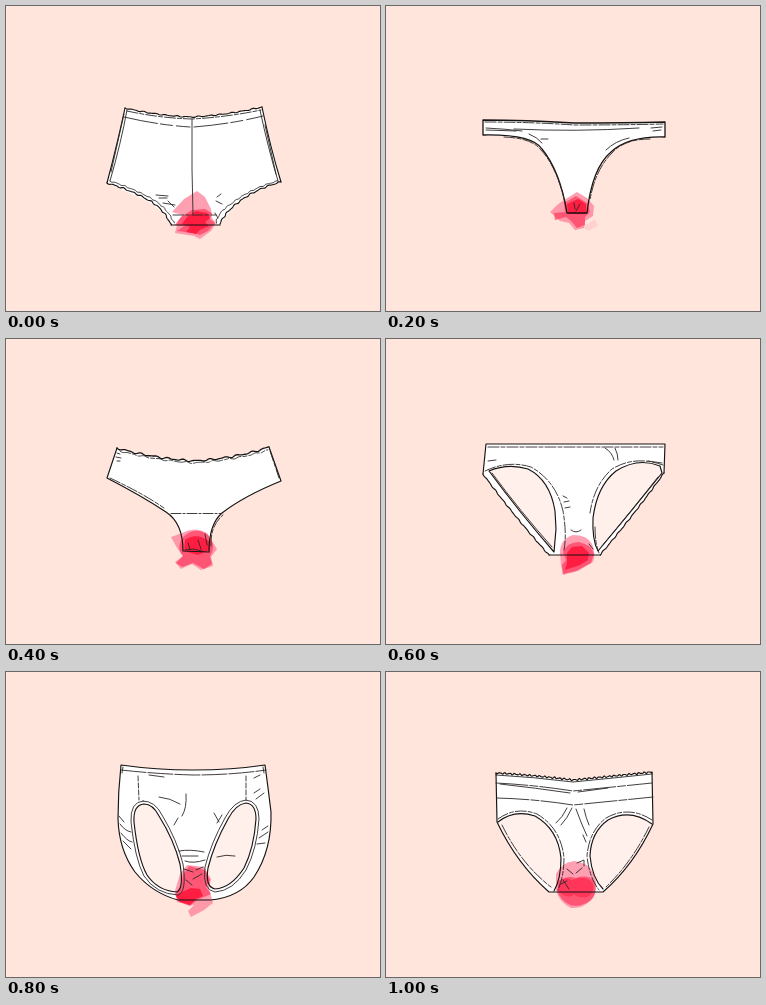
Animation, 374 px wide and 305 px high, one loop 1.2 s. Source, as an HTML page:

```html
<!DOCTYPE html>
<html lang="en">
<head>
<meta charset="utf-8">
<title>Underwear loop</title>
<style>
  html, body { margin: 0; width: 100%; height: 100%; overflow: hidden; background: #ffe5dc; }
  svg { display: block; width: 100%; height: 100%; }
  .pose { visibility: hidden; animation: show 1200ms step-end infinite; animation-delay: calc(var(--i) * 200ms - 1200ms); }
  .pose:first-child { animation-delay: 0ms; }
  @keyframes show {
    0% { visibility: visible; }
    16.666%, 100% { visibility: hidden; }
  }
  path { fill: none; stroke: #161313; stroke-width: 1.15; stroke-linecap: round; stroke-linejoin: round; }
  .cloth { fill: #fff; stroke: none; }
  .back { fill: #fff0ec; stroke: none; }
  .thin { stroke-width: .9; stroke: #2e2929; }
  .stitch { stroke-width: .9; stroke: #2e2929; stroke-dasharray: 11 2 4 2; }
  .stain path { stroke: none; fill: #ff0f35; }
  .stain .pale { fill: #ff7f98; opacity: .75; }
  .stain .mid { fill: #ff3c60; opacity: .72; }
  .stain .deep { opacity: .8; }
</style>
</head>
<body>
<svg viewBox="0 0 374 305" preserveAspectRatio="none">
  <!-- boyshorts -->
  <g class="pose" style="--i:0">
    <path class="cloth" d="M119 102Q153 110 186 111Q222 109 256 101L275 176Q247 184 228 201L214 218L165 219Q156 202 137 193L101 177Z"/>
    <g class="stain">
      <path class="pale" d="M166 206L178 193L191 185L199 191L205 203L206 212L210 217L205 225L194 233L188 230L169 227L172 215L177 209Z"/>
      <path class="mid" d="M175 211L186 204L199 203L206 207L204 213L209 217L202 225L194 229L187 227L171 225L178 220L169 219Z"/>
      <path class="deep" d="M181 211L190 205L201 207L204 212L199 216L203 220L194 224L190 228L180 226L184 221L176 218Z"/>
    </g>
    <path data-wave=".4 11" d="M119 102Q153 110 186 111Q222 109 256 101"/>
    <path class="stitch" d="M121 105Q153 112 186 113Q222 111 255 104"/>
    <path class="stitch" style="stroke-dasharray:34 3 12 4" d="M118 111Q152 119 184 121M188 121Q225 118 257 110"/>
    <path d="M119 102Q112 135 101 177M256 101Q264 140 275 176"/>
    <path class="thin" d="M121 104Q115 137 104 175M118 108L105 166M254 104Q262 142 272 175M259 119L270 168"/>
    <path data-wave=".5 10" d="M101 177Q125 184 144 195Q158 203 165 219M275 176Q248 183 229 199Q218 208 214 218"/>
    <path class="thin" data-wave=".4 9" d="M104 175Q129 183 148 194Q162 203 168 217M272 175Q245 182 225 198Q212 206 210 217"/>
    <path d="M165 219L214 219"/>
    <path class="thin" d="M186 113L186 163L187 208M150 189L162 190M153 192L161 192M157 197L169 199M162 195L168 201M211 191L215 188M210 195L216 198M209 207L212 212"/>
    <path class="stitch" d="M167 209L210 209"/>
  </g>

  <!-- thong -->
  <g class="pose" style="--i:1">
    <path class="cloth" d="M97 114Q140 114 188 117Q240 117 279 116L279 131Q242 130 225 146Q206 162 201 207L181 207Q174 165 156 143Q146 128 97 129Z"/>
    <g class="stain">
      <path class="pale" d="M164 206L171 199L178 194L191 186L201 192L208 200L207 210L199 215L198 222L189 224L183 217L174 215Z"/>
      <path class="mid" d="M178 197L190 190L201 197L204 206L199 211L199 219L191 222L185 215L180 211L169 214L168 207L179 206Z"/>
      <path class="deep" d="M181 198L192 193L200 198L200 208L182 208Z"/>
      <path class="pale" style="opacity:.18" d="M197 221L209 213L212 220L202 225Z"/>
    </g>
    <path style="stroke-width:1.3" d="M97 129L97 114Q140 114 188 117Q240 117 279 116L279 131Q242 130 225 146Q206 162 201 207L181 207Q174 165 156 143Q146 128 97 129"/>
    <path class="stitch" d="M99 116Q145 116 188 119Q238 119 277 118M118 131Q146 132 155 144Q171 161 179 197M264 133Q238 133 226 147Q209 164 204 194"/>
    <path class="thin" d="M100 122Q120 123 136 125M100 124L130 125M128 123Q190 126 253 122M265 122L276 121M267 125L275 124M155 133L162 133M143 128Q151 131 156 137M220 144Q229 135 243 132M188 197L189 203M194 198L190 205"/>
  </g>

  <!-- scalloped brief -->
  <g class="pose" style="--i:2">
    <path class="cloth" d="M111 109Q145 119 188 122Q232 119 263 108L275 142Q238 157 216 174Q203 185 203 213L177 212Q177 184 160 173Q136 157 101 139Z"/>
    <g class="stain">
      <path class="pale" d="M165 198L176 194Q189 187 201 194L206 202L211 210L205 218L207 227L195 231L186 225L175 230L169 223L177 217L171 209Z"/>
      <path class="mid" d="M178 197Q190 187 202 196Q211 207 204 217L206 225L198 230L187 224L176 228L170 224L177 217Q169 208 178 197Z"/>
      <path class="deep" d="M179 201Q190 193 203 202L204 211L192 216L178 212Z"/>
    </g>
    <path style="stroke-width:1.3" data-wave=".7 14" d="M111 109Q145 119 188 122Q232 119 263 108"/>
    <path class="stitch" data-wave=".5 14" d="M114 112Q147 121 188 124Q231 121 262 111"/>
    <path d="M111 109L101 139Q136 157 160 173Q177 184 177 212L203 213Q203 185 216 174Q238 157 275 142L263 108"/>
    <path class="stitch" d="M104 139Q138 155 158 169M264 112L273 139M205 207Q204 187 217 176"/>
    <path class="thin" d="M111 114L114 115M110 118L115 119M111 122L114 122M182 204L184 210M192 201L195 210M199 195L201 206M179 211L187 210L196 212"/>
    <path class="thin" style="stroke-dasharray:10 2 2 2" d="M165 174.500L216 174.500"/>
  </g>

  <!-- bikini brief -->
  <g class="pose" style="--i:3">
    <path class="cloth" d="M100 105L279 105L278 134Q247 177 214 216L163 216Q127 176 97 135Z"/>
    <path class="back" d="M103 132Q122 124 142 130Q164 141 169 172L170 190L168 213Q134 174 103 132ZM274 127Q252 118 230 132Q211 147 207 179Q206 201 212 212Q244 174 276 134Z"/>
    <g class="stain">
      <path class="pale" d="M174 214Q174 200 187 196Q201 196 206 205Q210 215 207 223L192 232L177 236L175 226Z"/>
      <path class="mid" d="M177 213Q181 203 193 203Q206 206 208 215L205 224L190 232L177 235L176 226L180 221Z"/>
      <path class="deep" d="M181 214L186 208L196 207L203 214L202 221L194 226L179 231L181 224Z"/>
    </g>
    <path d="M97 135L100 105L279 105L278 134"/>
    <path class="stitch" d="M102 108L277 108"/>
    <path data-wave=".3 12" d="M97 135Q127 176 163 216M278 134Q247 177 214 216"/>
    <path d="M163 216L214 216M103 132Q122 124 142 130Q164 141 169 172L170 190L168 213Q134 174 103 132M274 127Q252 118 230 132Q211 147 207 179Q206 201 212 212Q244 174 276 134Z"/>
    <path class="thin" d="M106 134Q134 172 166 208M272 138Q246 171 216 207"/>
    <path class="stitch" d="M99 132Q122 121 145 128Q170 142 177 172Q181 195 178 211M277 126Q249 116 226 130Q208 146 204 174M209 188Q209 205 213 214"/>
    <path class="thin" d="M219 109Q226 113 228 121M229 109Q232 115 232 121M102 122L110 121M262 122L276 124M177 157L181 159M178 163L183 162M179 169L184 168M185 191Q190 195 195 191M203 205L207 210"/>
  </g>

  <!-- full brief -->
  <g class="pose" style="--i:4">
    <path class="cloth" d="M115 93Q150 98 187 98Q226 98 259 93Q262 115 265 140Q266 178 248 205Q234 225 205 228L172 228Q146 221 129 200Q113 178 112 147Q112 120 115 93Z"/>
    <path class="back" d="M138 132Q147 132 153 144Q168 168 174 192Q178 216 171 220Q152 219 141 203Q132 187 128 150Q127 133 138 132ZM240 131Q250 132 250 147Q248 176 238 196Q225 216 209 217Q199 215 202 196Q208 172 222 147Q230 132 240 131Z"/>
    <g class="stain">
      <path class="pale" d="M174 202L181 193L198 195L205 207L203 217L207 231L198 238L185 245L182 239L188 233L171 230L169 219Z"/>
      <path class="mid" d="M177 203L183 194L199 198L204 208L200 215L205 222L191 228L184 234L173 230L169 222L175 214Z"/>
      <path class="deep" d="M176 220L185 216L194 217L197 224L190 227L184 233L174 230L170 224Z"/>
    </g>
    <path d="M115 93Q150 98 187 98Q226 98 259 93Q262 115 265 140Q266 178 248 205Q234 225 205 228L172 228Q146 221 129 200Q113 178 112 147Q112 120 115 93Z"/>
    <path class="stitch" style="stroke-dasharray:25 2" d="M115 98Q151 102 187 103Q226 103 260 98"/>
    <path class="thin" d="M117 95L116 101M257 95L258 101"/>
    <path d="M138 132Q147 132 153 144Q168 168 174 192Q178 216 171 220Q152 219 141 203Q132 187 128 150Q127 133 138 132ZM240 131Q250 132 250 147Q248 176 238 196Q225 216 209 217Q199 215 202 196Q208 172 222 147Q230 132 240 131Z"/>
    <path class="thin" d="M137 129Q149 129 156 143Q171 168 177 192Q181 220 172 223Q150 222 138 204Q129 187 125 150Q124 130 137 129ZM240 128Q253 129 253 147Q251 177 240 198Q227 219 209 220Q196 218 199 195Q205 171 219 146Q228 129 240 128Z"/>
    <path class="thin" style="stroke-dasharray:5 2" d="M132 104L133 128M240 104L240 127"/>
    <path class="thin" d="M143 103L158 105M153 125Q164 126 174 132M180 122Q181 136 176 144M172 146L168 153M113 144L118 150M114 152Q119 159 125 160M115 161Q121 169 126 170M117 169L125 177M208 141L213 150M216 143L211 151M248 121L254 117M250 127L258 121M256 158L262 154M253 166L262 160M251 172L259 171M211 185Q220 182 229 184M173 179Q184 177 198 180M176 184L192 184M179 189Q187 192 199 188M178 197L187 200M187 207L196 202M180 208L186 213M190 198L197 195M248 106L254 103"/>
  </g>

  <!-- lace hipster -->
  <g class="pose" style="--i:5">
    <path class="cloth" d="M110 101Q147 103 187 108Q228 104 266 100L267 152Q248 193 217 220L163 220Q131 192 111 150Z"/>
    <path class="back" d="M112 150Q128 137 149 144Q172 157 175 186Q175 207 168 219Q134 194 112 150ZM266 152Q244 136 222 148Q205 160 204 184Q206 206 217 217Q247 193 266 152Z"/>
    <g class="stain">
      <path class="pale" d="M170 202Q175 191 188 189Q202 190 208 202Q213 216 207 226Q198 237 185 236Q173 230 170 218Z"/>
      <path class="mid" d="M174 209Q181 203 190 206Q202 202 208 209Q212 221 205 228Q195 236 184 233Q174 228 171 218Z"/>
      <path class="deep" style="opacity:.45" d="M172 209Q181 203 188 210Q193 218 186 224Q177 226 172 218ZM186 208Q201 202 207 212Q209 221 201 225Q188 227 184 217Z"/>
    </g>
    <path data-wave=".7 5" d="M110 101Q147 103 187 108Q228 104 266 100"/>
    <path class="thin" d="M110 103Q147 105 187 110Q228 106 266 102"/>
    <path d="M110 101L111 150Q131 192 163 220L217 220Q248 193 267 152L266 100"/>
    <path class="stitch" style="stroke-dasharray:32 2 8 2" d="M110 111Q149 113 187 119Q227 115 266 111M111 126Q149 127 187 133Q228 129 267 125"/>
    <path class="thin" d="M114 112Q150 116 184 121M192 120L222 116"/>
    <path d="M112 150Q128 137 149 144Q172 157 175 186Q175 207 168 219M266 152Q244 136 222 148Q205 160 204 184Q206 206 217 217"/>
    <path class="stitch" d="M112 147Q130 134 151 142Q175 156 178 186Q178 204 172 218M266 148Q243 133 220 146Q203 159 201 184Q203 205 213 218M116 153Q135 192 165 215M263 155Q246 190 220 215"/>
    <path class="thin" d="M181 136Q177 145 170 151M186 136Q181 147 175 153M190 137Q195 151 201 164M198 137Q200 146 203 153M197 163L200 170M191 191L198 188L198 194M181 197L187 202M196 196L190 201M175 212L181 209M177 208L183 217"/>
  </g>
</svg>
<script>
  // Turn smooth edges into rippled ones: data-wave="height length"
  for (const path of document.querySelectorAll('[data-wave]')) {
    const [amp, len] = path.dataset.wave.split(' ').map(Number);
    const runs = path.getAttribute('d').split(/(?=M)/);
    path.setAttribute('d', runs.map(run => ripple(run, amp, len)).join(''));
  }

  function ripple(run, amp, len) {
    const line = document.createElementNS('http://www.w3.org/2000/svg', 'path');
    line.setAttribute('d', run);
    const total = line.getTotalLength();
    const steps = Math.ceil(total);
    let d = '';
    for (let i = 0; i <= steps; i++) {
      const s = total * i / steps;
      const p = line.getPointAtLength(s);
      const a = line.getPointAtLength(Math.max(0, s - 1));
      const b = line.getPointAtLength(Math.min(total, s + 1));
      const size = Math.hypot(b.x - a.x, b.y - a.y);
      const turn = 2 * Math.PI * s / len;
      const off = amp * (Math.sin(turn) + .5 * Math.sin(turn * 1.6));
      const x = p.x - off * (b.y - a.y) / size;
      const y = p.y + off * (b.x - a.x) / size;
      d += (i ? 'L' : 'M') + x.toFixed(2) + ' ' + y.toFixed(2);
    }
    return d;
  }
</script>
</body>
</html>
```
